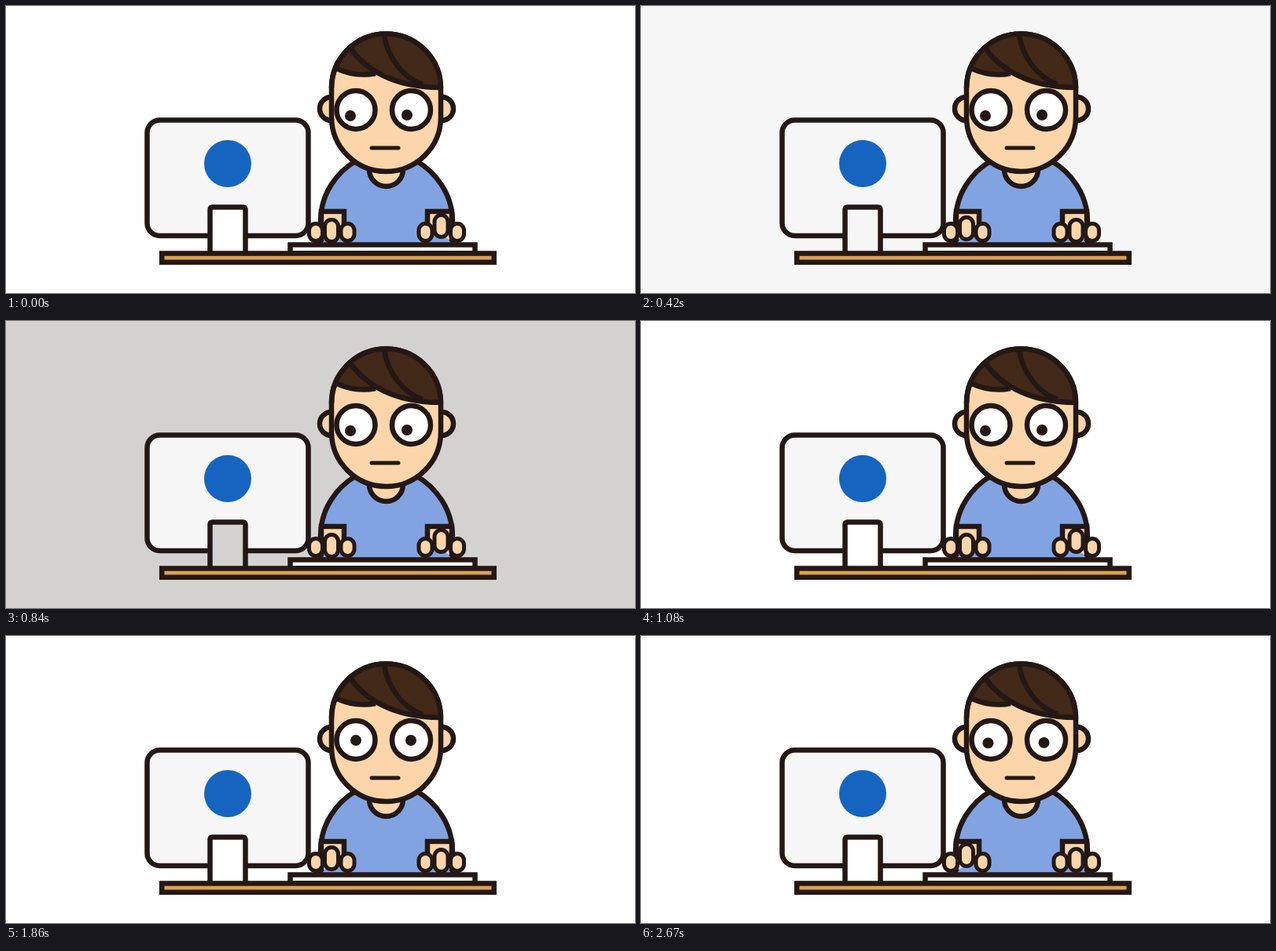
These frames come from a looping animation (800x366 px, 2700 ms). An HTML page:

```html
<!DOCTYPE html>
<html lang="en">
<head>
<meta charset="utf-8">
<title>At the desk</title>
<style>
html, body { margin: 0; width: 100%; height: 100%; overflow: hidden; background: #fff; }
svg { display: block; width: 100%; height: 100%; }
.ink { stroke: #231815; stroke-width: 6.5; }
.skin { fill: #fcd6aa; }
.line { fill: none; }
.finger { stroke-width: 5; }
</style>
</head>
<body>
<svg viewBox="0 0 800 366">
  <rect class="bg" width="800" height="366" fill="#fff"/>

  <g class="ink">
    <path fill="#82a3e1" d="M400 303V275C400 240 420 212 446 197H521C547 212 568 240 568 275V303" stroke-linecap="butt"/>
    <path class="skin" d="M462 206V208.500a21.500 21.500 0 0 0 43 0V206"/>
    <circle class="skin" cx="414" cy="131" r="15"/>
    <circle class="skin" cx="554" cy="131" r="15"/>
    <path class="skin" d="M414 105a69.500 69.500 0 0 1 139 0V141.500a69.500 69.500 0 0 1 -139 0Z"/>
    <path fill="#432918" d="M419 79Q444 92 470 86Q508 103 552.500 104A69.500 69.500 0 0 0 419 79Z" stroke="none"/>
    <path class="line" d="M419 79Q444 91 470 86M438 54C458 82 495 104 553 104M481 37C485 65 505 92 530 100"/>
    <path class="line" d="M414 105a69.500 69.500 0 0 1 139 0"/>
    <circle cx="445" cy="132.500" r="24.500" fill="#fff"/>
    <circle cx="515.500" cy="132.500" r="24.500" fill="#fff"/>
    <path class="line" d="M465 181H499" stroke-width="5" stroke-linecap="round" style="stroke-width:5"/>
  </g>
  <g fill="#231815">
    <circle class="pupil" cx="445" cy="133" r="7"/>
    <circle class="pupil" cx="515" cy="133" r="7"/>
  </g>

  <g class="ink">
    <rect x="179.500" y="145.500" width="205" height="147.500" rx="16" fill="#f6f6f6"/>
    <path class="bg" fill="#fff" d="M259.500 316V260q0-3.500 3.500-3.500H301q3.500 0 3.500 3.500V316"/>
    <path class="skin" d="M401 300V262H430V282"/>
    <path class="skin" d="M567 300V262H536V282"/>
    <rect x="361.500" y="304.500" width="235" height="11" fill="#fff"/>
    <rect x="198.200" y="315.500" width="422.500" height="11.300" fill="#dfa14d"/>
  </g>
  <g id="hands" class="ink skin"></g>
  <circle cx="282" cy="201" r="30" fill="#1565c0"/>
</svg>
<script>
const LOOP = 2700, STEP = 30;
const LEFT_TAP = [0, -7, -3, 0], RIGHT_TAP = [-6, -1, 0, -2];
const all = s => [...document.querySelectorAll(s)];
const clamp = v => Math.max(0, Math.min(1, v));
const ease = v => { v = clamp(v); return v * v * (3 - 2 * v); };

function finger(x, top, h) {
  const r = document.createElementNS('http://www.w3.org/2000/svg', 'rect');
  const attrs = { class: 'finger', x: x - 8.5, y: top + 2.5, width: 17, height: h - 5, rx: 8.5 };
  for (const k in attrs) r.setAttribute(k, attrs[k]);
  document.getElementById('hands').append(r);
  return r;
}
function hand(x) {
  finger(x - 20, 275, 27);
  finger(x + 20.5, 275, 27);
  return finger(x, 270, 33);
}
const left = hand(414), right = hand(553.5);
const backs = all('.bg'), pupils = all('.pupil');

function draw(t) {
  const n = t / STEP;
  const shift = (el, x, y) => el.setAttribute('transform', `translate(${x} ${y})`);
  shift(left, 0, LEFT_TAP[n % 4]);
  shift(right, 0, RIGHT_TAP[n % 4]);

  // glance at the screen, then straight ahead
  const look = 1 - ease((t - 1290) / 60) + ease((t - 2640) / 60);
  shift(pupils[0], -7 * look, 7 * look);
  shift(pupils[1], -5 * look, 6 * look);

  // three dim pulses of the backdrop
  const dim = t < 1620 ? 0.235 * clamp(1 - Math.abs(t % 540 - 270) / 180) : 0;
  const mix = c => Math.round(255 - (255 - c) * dim);
  for (const b of backs) b.setAttribute('fill', `rgb(${mix(35)},${mix(24)},${mix(21)})`);
}

const start = performance.now();
function tick() {
  const t = (performance.now() - start) % LOOP;
  draw(Math.floor(t / STEP) * STEP);
  requestAnimationFrame(tick);
}
draw(0);
requestAnimationFrame(tick);
</script>
</body>
</html>
```
